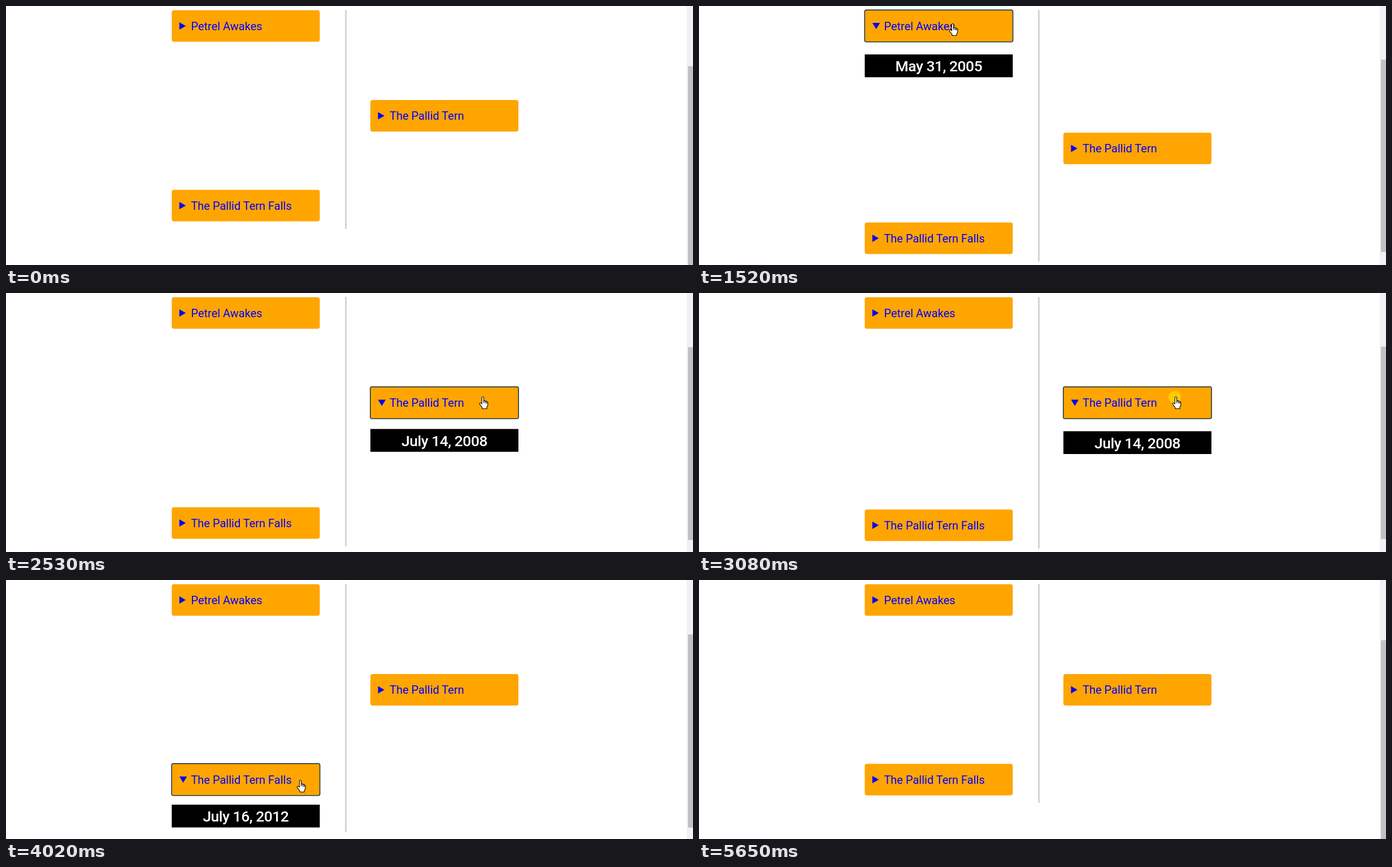
An HTML page that plays this animation: 1216 px wide and 460 px high, repeating every 5.8 s.

```html
<!DOCTYPE html>
<html lang="en">
<head>
<meta charset="utf-8">
<title>Timeline accordion</title>
<style>
  html, body { margin: 0; width: 100%; height: 100%; overflow: hidden; background: #fff; }
  svg { display: block; width: 1216px; height: 460px; }
  .title { font: 400 20px Roboto, sans-serif; fill: blue; }
  .date { font: 500 26.5px Roboto, sans-serif; letter-spacing: -.5px; fill: #fff; text-anchor: middle; }
  .ring { fill: none; stroke: #213c46; stroke-width: 1.6; }
  .cursor path { fill: #fff; stroke: #000; stroke-width: 1.1; stroke-linejoin: round; stroke-linecap: round; }
</style>
</head>
<body>
<svg viewBox="0 0 1216 460">
  <rect id="line" x="600" y="7" width="3" fill="#d5d5d5"/>
  <g id="rows"></g>
  <rect x="1205" width="11" height="460" fill="#f1f1f1"/>
  <rect id="thumb" x="1207" width="9" fill="#c1c1c1"/>
  <circle id="press" r="11" cx="-2" cy="1" fill="#ffd800" opacity=".75"/>
  <g id="cursor" class="cursor">
    <path id="arrow" d="M0 0V17L4 13.3L6.5 19L9 18L6.5 12.4H12Z"/>
    <g id="hand">
      <path d="M-1.6 13V2Q-1.6 .5 0 .5T1.6 2V7.5Q3.8 6.4 4.4 8.3Q6.4 7.3 6.8 9.3Q8.8 8.8 8.8 11V15.5L7 19V21.5H-1V19.5L-5.4 13.6Q-6.4 11.6-4.6 11.2Q-3.4 11-1.6 13Z"/>
      <path d="M1.6 7.5V11M4.4 8.3V11.5M6.8 9.3V12" fill="none"/>
    </g>
  </g>
</svg>
<script>
const LOOP = 5800, SLIDE = 400, DATE_SPACE = 48, GAP = 10;
const rows = [
  { title: 'Petrel Awakes', date: 'May 31, 2005', x: 293.4, y: 7.5, open: 790, close: 1590, focus: 750 },
  { title: 'The Pallid Tern', date: 'July 14, 2008', x: 645, y: 167, open: 2380, close: 3230, focus: 2214 },
  { title: 'The Pallid Tern Falls', date: 'July 16, 2012', x: 293.4, y: 326.5, open: 3920, close: 4690, focus: 3700 }
];
// Screen updates: start, end, number of evenly spaced steps
const runs = [[130, 670, 8], [750, 1290, 8], [1440, 1990, 8], [2060, 2600, 8], [2680, 2830, 3],
  [3080, 3620, 8], [3700, 3780, 2], [3930, 4330, 6], [4540, 5090, 8], [5650, 5650, 1]];
const presses = [750, 1440, 2214, 3080, 3700, 4540];
// Pointer path: time, x, y
const path = [[130, 712, 377], [670, 449, 31], [1590, 449, 31], [2210, 844, 184],
  [3235, 844, 184], [3542, 543, 344], [3700, 521, 355]];

const $ = id => document.getElementById(id);
const set = (el, attrs) => { for (const k in attrs) el.setAttribute(k, attrs[k]); return el; };
const show = (el, on) => { el.style.display = on ? '' : 'none'; };
const clamp = v => Math.min(1, Math.max(0, v));
const smooth = v => v * v * (3 - 2 * v);

function add(parent, tag, attrs, text = '') {
  const el = set(document.createElementNS('http://www.w3.org/2000/svg', tag), attrs);
  el.textContent = text;
  return parent.appendChild(el);
}

// CSS "ease": cubic-bezier(.25, .1, .25, 1)
function ease(x) {
  const curve = (u, a, b) => 3 * u * (1 - u) ** 2 * a + 3 * u * u * (1 - u) * b + u ** 3;
  let lo = 0, hi = 1;
  for (let i = 0; i < 18; i++) {
    const mid = (lo + hi) / 2;
    if (curve(mid, .25, .25) < x) lo = mid; else hi = mid;
  }
  return curve(lo, .1, 1);
}

for (const row of rows) {
  row.el = add($('rows'), 'g', {});
  add(row.el, 'rect', { width: 262, height: 56, rx: 4, fill: 'orange' });
  row.ring = add(row.el, 'rect', { class: 'ring', x: -.2, y: -.4, width: 262.4, height: 56.7, rx: 3 });
  row.marker = add(row.el, 'path', { fill: 'blue' });
  add(row.el, 'text', { class: 'title', x: 34, y: 35 }, row.title);
  row.panel = add(row.el, 'g', {});
  add(row.panel, 'rect', { width: 262, height: 40.5 });
  add(row.panel, 'text', { class: 'date', x: 131, y: 30 }, row.date);
}

function stepTime(t) {
  let shown = 0;
  for (const [start, end, count] of runs) {
    if (t < start) break;
    const gap = (end - start) / (count - 1 || 1);
    shown = start + gap * Math.min(count - 1, Math.floor((t - start + 4) / (gap || 1)));
  }
  return shown;
}

function pointerAt(t) {
  let i = 0;
  while (i < path.length - 2 && t > path[i + 1][0]) i++;
  const [t0, x0, y0] = path[i], [t1, x1, y1] = path[i + 1];
  const k = smooth(clamp((t - t0) / (t1 - t0)));
  return [x0 + (x1 - x0) * k, y0 + (y1 - y0) * k];
}

function draw(t) {
  const [px, py] = pointerAt(t);
  let shift = 0, hover = false;

  rows.forEach((row, i) => {
    const open = t >= row.open && t < row.close;
    const gap = GAP * (ease(clamp((t - row.open) / SLIDE)) - ease(clamp((t - row.close) / SLIDE)));
    const blur = i < 2 ? rows[i + 1].focus : 5650;
    const y = row.y + shift;

    set(row.el, { transform: `translate(${row.x} ${y})` });
    set(row.marker, { d: open ? 'M13.5 22.5H27L20.2 33.5Z' : 'M13.5 21.5V34.5L24.8 28Z' });
    set(row.panel, { transform: `translate(0 ${68.5 + Math.round(gap)})` });
    show(row.panel, open);
    show(row.ring, t >= row.focus && t < blur);

    hover = hover || (px >= row.x && px <= row.x + 262 && py >= y && py <= y + 56);
    shift += Math.round(gap) + (open ? DATE_SPACE : 0);
  });

  const top = 107 - .2 * shift;
  set($('line'), { height: 389 + shift });
  set($('thumb'), { y: top, height: 462.6 - .44 * shift - top });

  const at = { transform: `translate(${Math.round(px)} ${Math.round(py)})` };
  set($('cursor'), at);
  set($('press'), at);
  show($('cursor'), t >= 130 && t < 5650);
  show($('hand'), hover);
  show($('arrow'), !hover);
  show($('press'), presses.some(p => t >= p && t < p + 75));
}

function tick() {
  draw(stepTime(performance.now() % LOOP));
  requestAnimationFrame(tick);
}
tick();
</script>
</body>
</html>
```
